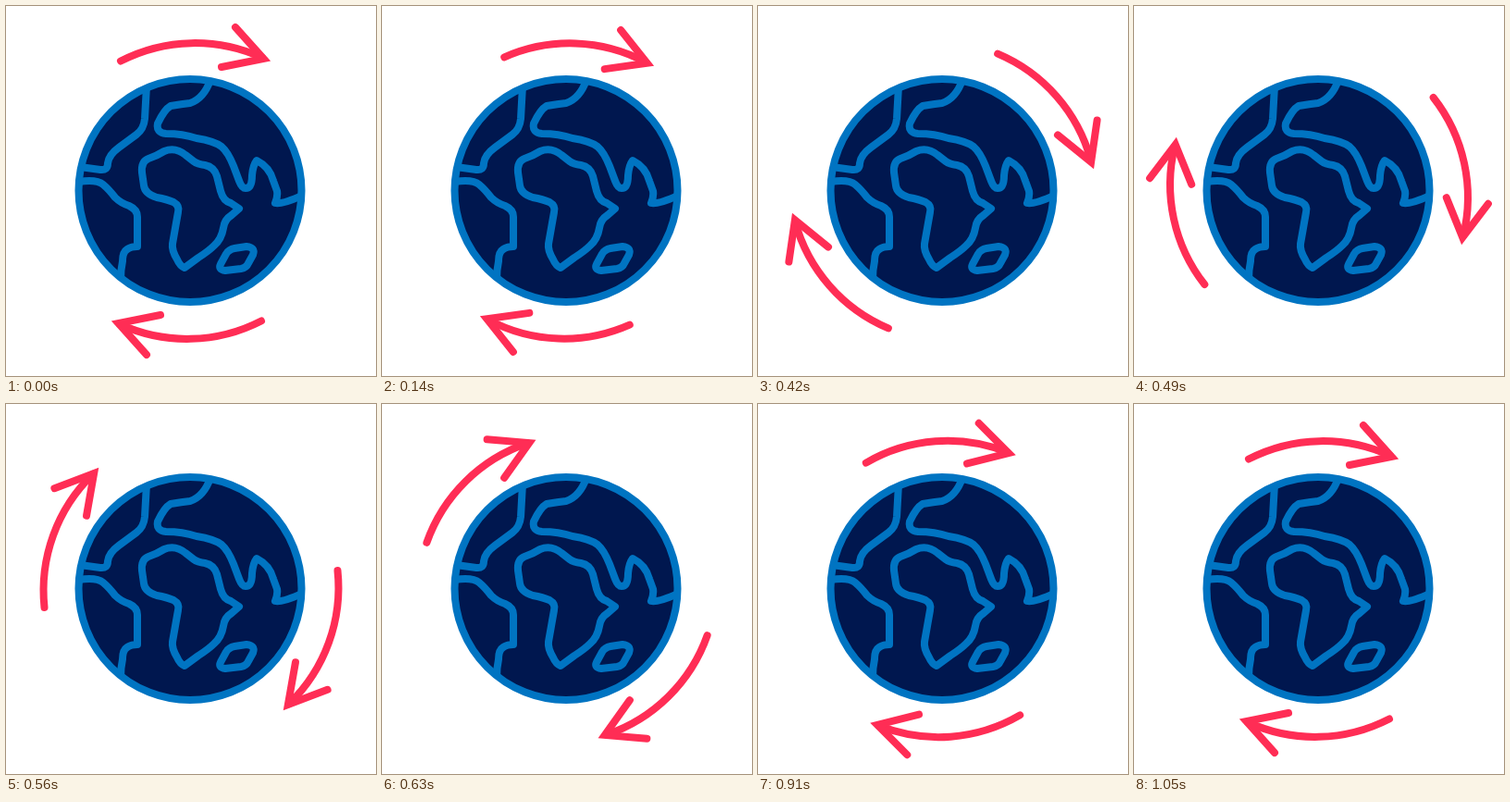
Write an HTML page that moves like this. It is 400 by 400 pixels and loops after 1.82 s.

```html
<!DOCTYPE html>
<html lang="en">
<head>
<meta charset="utf-8">
<title>Turning globe</title>
<style>
  html, body { margin: 0; height: 100%; overflow: hidden; background: #fff; }
  svg { display: block; width: 100vw; height: 100vh; }
  path, circle { fill: none; stroke-width: 8; }
  .globe { stroke: #0074c2; stroke-linejoin: round; stroke-linecap: round; }
  .arrows { stroke: #ff2d55; stroke-linecap: round; }
</style>
</head>
<body>
<svg viewBox="0 0 400 400">
  <defs>
    <clipPath id="disc"><circle cx="199" cy="199.5" r="120"/></clipPath>
    <g id="arrow">
      <path d="M124 59.5A175 175 0 0 1 277 56"/>
      <path d="M248 23L278.5 57L233 66"/>
    </g>
  </defs>
  <g class="globe">
    <circle cx="199" cy="199.5" r="120.5" style="fill:#00174f"/>
    <g clip-path="url(#disc)">
      <!-- the Americas -->
      <path d="M152 86L150 122Q149 133 141 139L122 153Q111 161 110 170Q110 178 102 177L80 174"/>
      <path d="M78 190Q98 187 105 193Q111 198 118 207Q124 213 133 216Q142 220 142 228V260Q135 260 131 263Q126 266 126 276Q124 285 124 296"/>
      <!-- Europe and Asia -->
      <path d="M221 80Q214 100 199 105Q190 106 178 108Q171 112 164 127Q162 137 173 138Q191 138 206 143Q225 146 233 152Q240 158 246 173L252 189Q255 197 259 197Q266 197 266 183Q267 172 271 167Q285 174 289 189L293 200Q294 206 291 213Q298 215 322 204"/>
      <!-- Africa and Madagascar -->
      <path d="M147 180Q146 168 154 165Q163 162 171 157Q183 152 194 161L203 168Q207 171 215 172Q225 174 228 184L232 200Q235 211 243 213L252 219L244 226Q236 231 235 240Q233 252 225 259Q219 265 208 272L193 283Q188 281 185 274Q179 264 180 257L186 223Q188 216 181 212Q174 209 163 207Q150 203 149 194Z"/>
      <path d="M238 268Q241 263 247 262L260 260Q270 261 267 269L262 278Q260 283 254 284L237 286Q229 285 232 279Z"/>
    </g>
  </g>
  <g class="arrows" id="arrows">
    <use href="#arrow"/>
    <use href="#arrow" transform="rotate(180 200 200)"/>
  </g>
</svg>
<script>
  const LOOP = 1820, TURN = 1050, STEP = 70;
  const arrows = document.getElementById('arrows');

  // Cubic Bézier easing (.62, 0, .35, 1), solved by bisection.
  function ease(x) {
    let lo = 0, hi = 1;
    for (let i = 0; i < 24; i++) {
      const s = (lo + hi) / 2, r = 1 - s;
      if (3 * r * r * s * 0.62 + 3 * r * s * s * 0.35 + s ** 3 < x) lo = s;
      else hi = s;
    }
    return lo * lo * (3 - 2 * lo);
  }

  const start = performance.now();
  function draw() {
    const time = (performance.now() - start) % LOOP;
    const stepped = Math.floor(time / STEP) * STEP;
    const angle = stepped < TURN ? 180 * ease(stepped / TURN) : 180;
    arrows.setAttribute('transform', `rotate(${angle} 200 200)`);
    requestAnimationFrame(draw);
  }
  draw();
</script>
</body>
</html>
```
